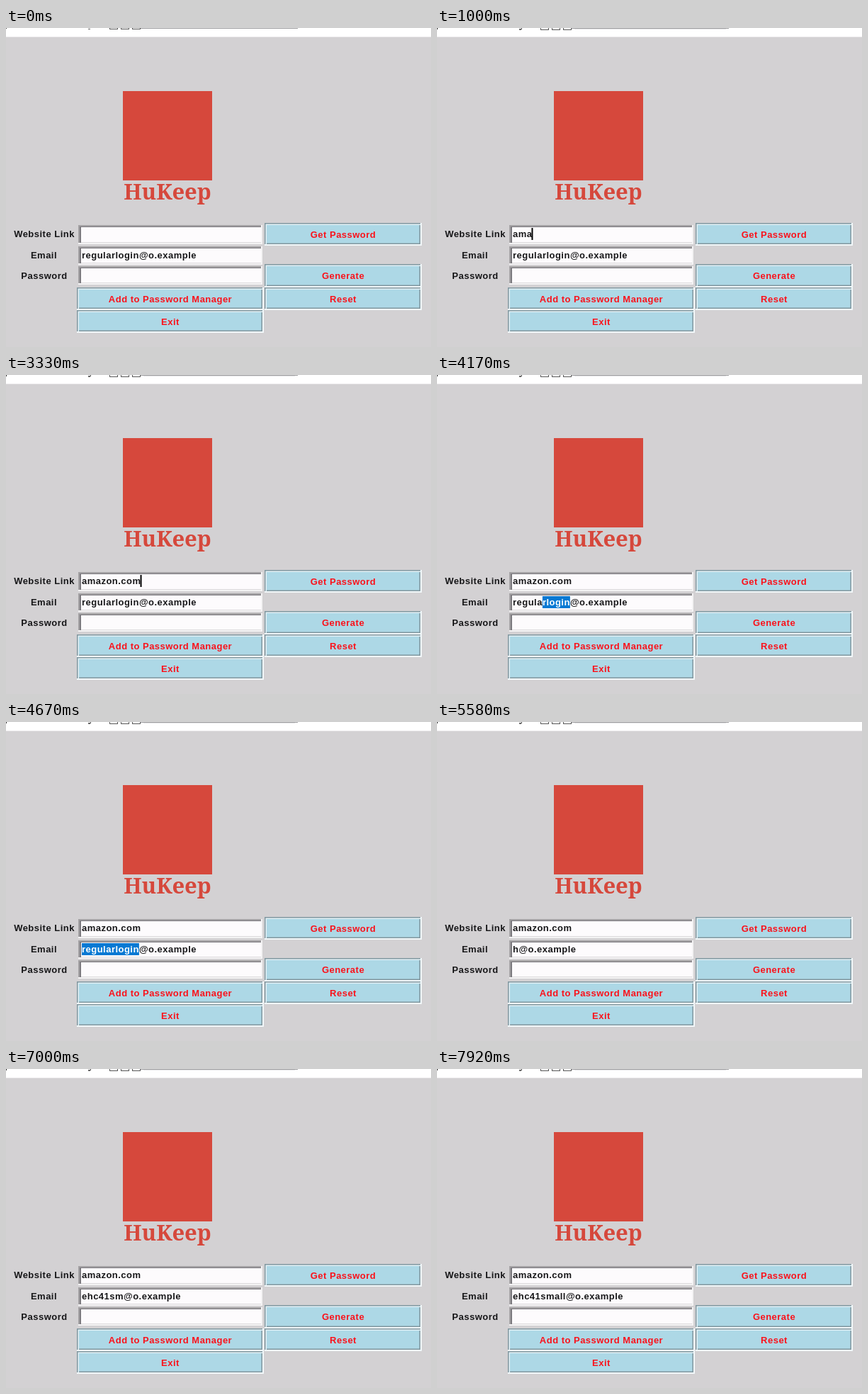
Animation, 600 px wide and 450 px high, one loop 8 s. Source, as an HTML page with a canvas:

```html
<!DOCTYPE html>
<html lang="en">
<head>
<meta charset="utf-8">
<title>Password manager form</title>
<style>
html, body { margin: 0; width: 100%; height: 100%; overflow: hidden; background: #d3d1d3; }
canvas { display: block; }
</style>
</head>
<body>
<canvas id="stage" width="600" height="450"></canvas>
<script>
const ctx = document.getElementById('stage').getContext('2d');
const LOOP = 8000;
const FONT = 'bold 13px "Liberation Sans", Arial, sans-serif';
const LOGO_FONT = 'bold 31px "Noto Serif", "Liberation Serif", serif';
const RED = '#d6483c', INK = '#171719';
const SITE = 'amazon.com', MAIL = 'regularlogin', DOMAIN = '@o.example', NEW_MAIL = 'ehc41small';

// Moments at which each character appears
const siteKeys = [580, 750, 920, 1080, 1250, 1580, 1670, 1750, 1830, 2000];
const mailKeys = [6000, 6170, 6330, 6500, 6670, 6830, 6950, 7170, 7330, 7500];
const typed = (text, keys, t) => text.slice(0, keys.filter(k => k <= t).length);

function rect(x, y, w, h, color) {
  ctx.fillStyle = color;
  ctx.fillRect(x, y, w, h);
}

function setFont(font) {
  ctx.font = font;
  ctx.letterSpacing = font === FONT ? '0.48px' : '0px';
}

function label(text, x, y, color = INK, align = 'center', font = FONT) {
  setFont(font);
  ctx.textAlign = align;
  ctx.fillStyle = color;
  ctx.fillText(text, x, y);
}

function textWidth(text) {
  setFont(FONT);
  return ctx.measureText(text).width;
}

function entry(y, h) {
  rect(102, y, 260, h, '#f4f3f4');
  rect(102, y, 258, h - 2, '#a3a1a3');
  rect(104, y + 2, 256, h - 4, '#7d7b80');
  rect(106, y + 3, 254, h - 5, '#fdfbfd');
  rect(106, y + h - 3, 254, 1, '#dddbdd');
}

// Grooved border: a dark frame with a light one offset down and right
function button(text, x, y, w, h) {
  rect(x, y, w, h, '#f1f7f9');
  rect(x, y, w - 2, h - 2, '#81979f');
  rect(x + 1.5, y + 1.5, w - 3.5, h - 3.5, '#e3f2f7');
  rect(x + 3, y + 3, w - 5, h - 5, '#81979f');
  rect(x + 3, y + 3, w - 6.5, h - 6.5, '#add8e6');
  label(text, x + w / 2, y + h / 2 + 4.5, '#fa121b');
}

function titleStrip(t) {
  const drop = t < 80 ? 0 : 1;
  rect(0, 0, 600, 12.6, '#fff');
  rect(190, 0, 222, 1, '#a0a0a2');
  rect(194, 1, 214, drop, '#e2e2e4');
  for (const x of [146, 162, 178]) {
    rect(x, 0, 12, 2 + drop, '#555');
    rect(x + 1, 0, 10, 1 + drop, '#fff');
  }
  rect(0, 0, 1, 1 + drop, '#333');
  rect(116, 1, 3, 1 + drop, '#666');
  rect(119, 0, 1, 2 * drop, '#666');
}

function siteField(t) {
  const text = typed(SITE, siteKeys, t);
  label(text, 107, 295, INK, 'left');
  const blinkOn = (t - 620 + 900) % 900 < 600;
  if (t >= 580 && t < 3750 && blinkOn) rect(106 + textWidth(text), 282, 2, 17, '#000');
}

function mailField(t) {
  const user = t < 5250 ? MAIL : t < 5830 ? 'h' : typed(NEW_MAIL, mailKeys, t);
  label(user + DOMAIN, 107, 325, INK, 'left');
  if (t < 3900 || t >= 5250) return;

  // The drag selects leftwards, a whole letter at a time
  const count = Math.round(MAIL.length * Math.min(1, (t - 3900) / 520));
  const left = 107 + textWidth(MAIL.slice(0, MAIL.length - count));
  const right = 107 + textWidth(MAIL);
  rect(left, 312, right - left, 17, '#0879d3');
  ctx.save();
  ctx.beginPath();
  ctx.rect(left, 312, right - left, 17);
  ctx.clip();
  label(MAIL, 107, 325, '#fff', 'left');
  ctx.restore();
}

function draw(now) {
  const t = now % LOOP;
  rect(0, 0, 600, 450, '#d3d1d3');
  titleStrip(t);

  rect(165, 89, 126, 126, RED);
  label('HuKeep', 228, 242, RED, 'center', LOGO_FONT);

  label('Website Link', 54, 295);
  label('Email', 53.5, 325);
  label('Password', 54, 354);
  entry(278, 27);
  entry(308, 26);
  entry(336, 26);
  siteField(t);
  mailField(t);

  button('Get Password', 365, 275, 222, 32);
  button('Generate', 365, 333, 222, 33);
  button('Add to Password Manager', 100, 366, 264, 32);
  button('Reset', 365, 366, 222, 32);
  button('Exit', 100, 398, 264, 32);
}

const start = performance.now();
function tick() {
  draw(performance.now() - start);
  requestAnimationFrame(tick);
}
tick();
</script>
</body>
</html>
```
